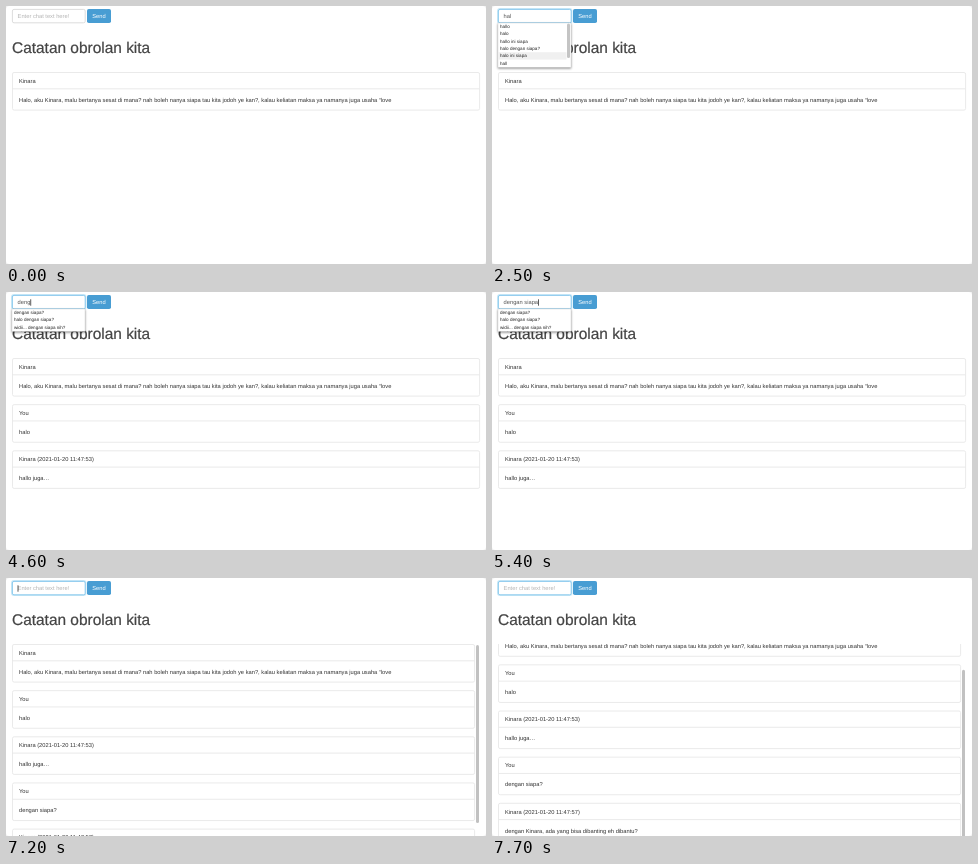
Write an HTML page that moves like this. It is 480 px wide and 258 px high and loops after 8000 ms.

```html
<!DOCTYPE html>
<html lang="id">
<head>
<meta charset="utf-8">
<title>Catatan obrolan</title>
<style>
  html, body { margin: 0; width: 100%; height: 100%; overflow: hidden; background: #fff; }
  svg { display: block; width: 100vw; height: 100vh; }
  text {
    font-family: "Liberation Sans", Arial, sans-serif;
    font-size: 5.74px; fill: #333; white-space: pre;
    text-rendering: geometricPrecision;
  }
  .title { font-size: 15.45px; fill: #444; stroke: #444; stroke-width: .22px; }
  .option { font-size: 4.58px; fill: #222; }
  .line { fill: none; stroke: #e5e5e5; stroke-width: .8; }
  #list { filter: drop-shadow(0 1px 1.3px rgba(0, 0, 0, .45)); }
</style>
</head>
<body>
<svg viewBox="0 0 480 258" preserveAspectRatio="none">
  <defs><clipPath id="view"><rect y="66" width="480" height="192"/></clipPath></defs>
  <rect width="480" height="258" fill="#eee"/>
  <rect width="480" height="258" rx="3.5" fill="#fff"/>

  <text class="title" x="6" y="47.3">Catatan obrolan kita</text>
  <g clip-path="url(#view)">
    <g id="log"></g>
    <rect id="thumb" x="470" width="3" height="178" rx="1.5" fill="#c1c1c1"/>
  </g>

  <rect id="glow" x="6" y="3" width="73.5" height="14" rx="2" fill="none" stroke="#66bce9" stroke-opacity=".35" stroke-width="2"/>
  <rect id="field" x="6.4" y="3.4" width="72.8" height="13.4" rx="1.6" fill="#fff" stroke-width=".8"/>
  <text id="entry" x="11.6" y="12.3"></text>
  <rect id="caret" y="7.3" width=".8" height="6.4" fill="#333"/>

  <rect x="81" y="3" width="24" height="14" rx="1.8" fill="#489dd3"/>
  <text x="86.2" y="12.3" style="fill:#fff">Send</text>
  <g id="list"></g>
</svg>
<script>
const LOOP = 8000, PITCH = 46.15, ROW = 7.38;
const $ = id => document.getElementById(id);

const messages = [
  ["Kinara", "Halo, aku Kinara, malu bertanya sesat di mana? nah boleh nanya siapa tau kita jodoh ye kan?, kalau keliatan maksa ya namanya juga usaha “love"],
  ["You", "halo"],
  ["Kinara (2021-01-20 11:47:53)", "hallo juga…"],
  ["You", "dengan siapa?"],
  ["Kinara (2021-01-20 11:47:57)", "dengan Kinara, ada yang bisa dibanting eh dibantu?"]
];

const history = [
  "hallo", "halo", "hallo ini siapa", "dengan siapa?", "halo dengan siapa?", "halo ini siapa",
  "hall", "widii... dengan siapa nih?", "di mana?", "dari mana?", "duh"
];

const within = (t, spans) => spans.some(([a, b]) => t >= a && t < b);

function typed(t) {
  if (t >= 2000 && t < 3100) return "halo".slice(0, t >= 2700 ? 4 : Math.min(3, (t - 2000) / 100 + 1));
  if (t >= 4400 && t < 7200) {
    const step = (t - 4400) / 100;
    return "dengan siapa".slice(0, step ? step + 2 : 1);
  }
  return "";
}

const caretOn = t => within(t, [[900, 1400], [2000, 2500], [2700, 3100], [3700, 4200], [4400, 5900], [6500, 7700]]);

function listOpacity(t) {
  if (t >= 6800) return Math.max(0, 1 - (t - 6700) / 300);
  return t === 3000 ? .4 : 1;
}

const hovered = t => t === 2400 ? 5 : t >= 2500 && t < 2700 ? 4 : -1;

function panel([head, body], i, right, scroll) {
  const y = 66.5 + i * PITCH - scroll;
  return `<rect class="line" x="6.5" y="${y}" width="${right - 6.5}" height="37.6" rx="1.6"/>
    <path class="line" d="M6.5 ${y + 16.3}H${right}"/>
    <text x="13" y="${y + 10.3}">${head}</text>
    <text x="13" y="${y + 29.2}">${body}</text>`;
}

function dropdown(word, hover) {
  if (!word) return "";
  const rows = history.filter(s => s.startsWith(word) || s.includes(" " + word));
  const long = rows.length > 5;
  const height = rows.length * ROW + (long ? 0 : .2);
  const option = (s, i) =>
    (i === hover ? `<rect x="6.2" y="${17 + i * ROW - .3}" width="68.3" height="${ROW}" fill="#f0f0f0"/>` : "") +
    `<text class="option" x="8" y="${21.9 + i * ROW}">${s}</text>`;
  return `<rect x="6" y="17" width="73" height="${height}" fill="#fff" stroke="#ccc" stroke-width=".4"/>` +
    rows.map(option).join("") +
    (long ? `<rect x="75" y="17.5" width="3" height="34.5" rx="1.5" fill="#c4c4c4"/>` : "");
}

function render(t) {
  const word = typed(t);
  const count = t >= 7200 ? 5 : t >= 3100 ? 3 : 1;
  const scrollable = count === 5;
  const progress = Math.min(1, Math.max(0, (t - 7200) / 200));
  const scroll = 25.8 * (1 - Math.cos(Math.PI * progress)) / 2;
  const right = scrollable ? 468.6 : 473.6;

  $("log").innerHTML = messages.slice(0, count).map((m, i) => panel(m, i, right, scroll)).join("");
  $("thumb").setAttribute("y", 67 + scroll * .96);
  $("thumb").setAttribute("opacity", scrollable ? 1 : 0);

  const focus = t < 800 ? 0 : t < 900 ? .5 : 1;
  $("glow").setAttribute("opacity", focus);
  $("field").setAttribute("stroke", ["#d4d4d4", "#a5cadf", "#76c0ea"][focus * 2]);

  const entry = $("entry");
  entry.textContent = word || "Enter chat text here!";
  entry.style.fill = word ? "#555" : "#b4b4b4";
  $("caret").setAttribute("x", 11.6 + (word ? entry.getComputedTextLength() : 0));
  $("caret").setAttribute("opacity", caretOn(t) ? 1 : 0);

  $("list").innerHTML = dropdown(word, hovered(t));
  $("list").setAttribute("opacity", listOpacity(t));
}

const start = performance.now();
let last = -1;
function tick() {
  const t = Math.floor((performance.now() - start) % LOOP / 100) * 100;
  if (t !== last) render(last = t);
  requestAnimationFrame(tick);
}
tick();
</script>
</body>
</html>
```
